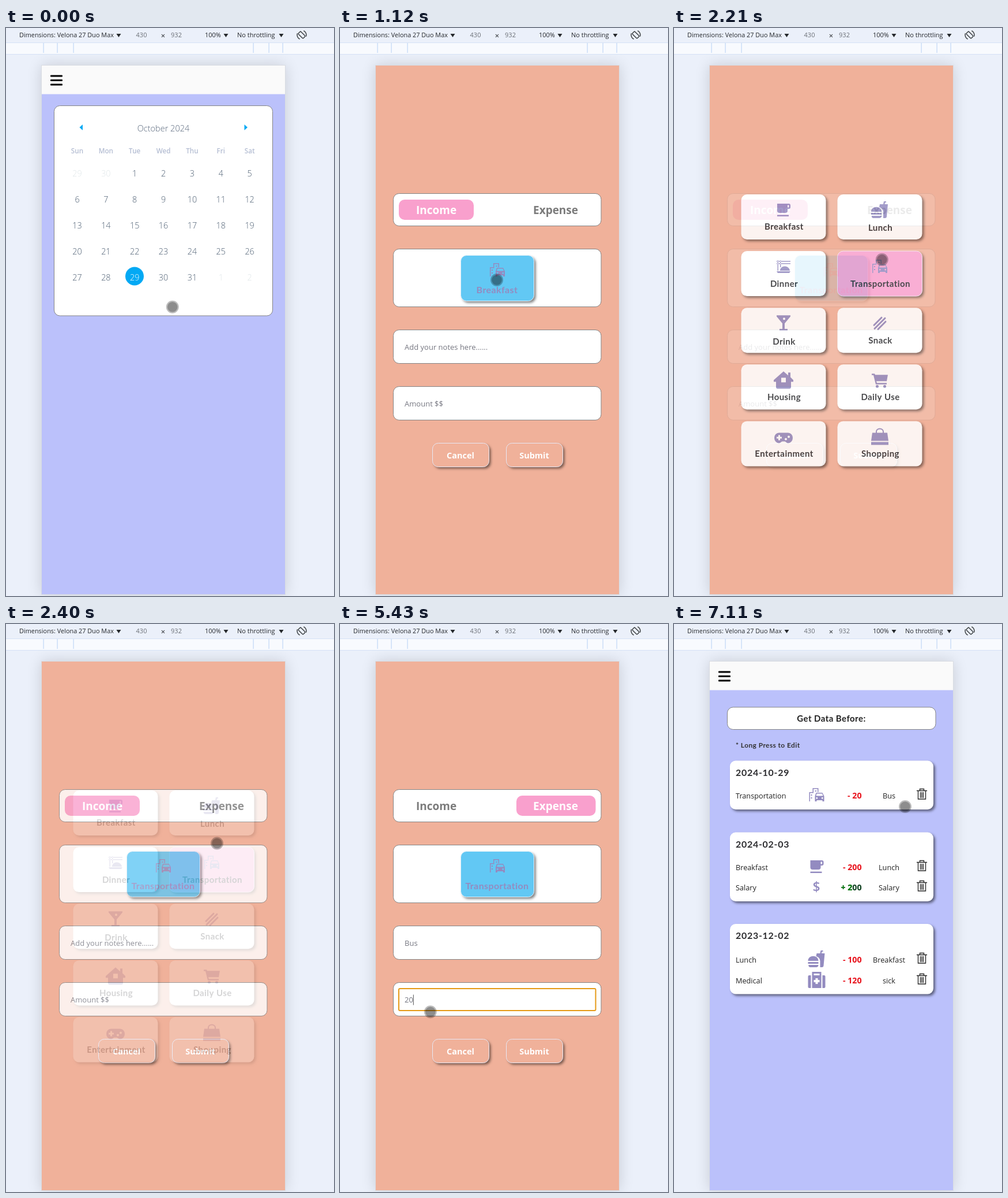
Write an HTML page with a canvas that moves like this. It is 569 by 983 pixels and loops after 7.57 s.

```html
<!DOCTYPE html>
<html lang="en">
<head>
<meta charset="utf-8">
<title>Budget calendar demo</title>
<style>
html, body { margin: 0; width: 100%; height: 100%; overflow: hidden; background: #ebf0fa; }
canvas { display: block; }
</style>
</head>
<body>
<canvas id="stage" width="569" height="983"></canvas>
<script>
const LOOP = 7570;
const stage = document.getElementById('stage');
const screen = stage.getContext('2d');
const layer = document.createElement('canvas');
layer.width = stage.width;
layer.height = stage.height;
const layerCtx = layer.getContext('2d');
let ctx = screen;

const UI = '"Open Sans", "Noto Sans", sans-serif';
const LATO = 'Lato, sans-serif';
const PEACH = '#f0b19a', LAVENDER = '#bbc1fb', PINK = '#f9a0cd', SKY = '#62c8f4';
const PURPLE = '#938bc0', BLUE = '#03a9f4', EDGE = '#858585';

// Icon outlines in pixels around their centre
const ICONS = {
  cup: 'M-11-11H9a3 3 0 0 1 3 3v3a3 3 0 0 1-3 3H7v3a4 4 0 0 1-4 4H-7a4 4 0 0 1-4-4zM7-8.5v4h2.5v-4zM-11 8.5H9V11H-11z',
  burger: 'M0-10H6l1-5h4v2H9l-.5 3H14L12 11a3 3 0 0 1-3 3H6V4c0-5-3-8-7-9zM-15 3c0-11 18-11 18 0zM-15 5H3v3H-15zM-14 10H3a4 4 0 0 1-4 4H-11a3 3 0 0 1-3-4z',
  noodles: 'M-12 8H12l-2 3H-10zM-10.5-11H-9V7h-1.5zM-6-11h1.5V1H-6zM-12-10H12v1.5H-12zM-12-6H12v1.5H-12zM-6 7c0-10 16-10 17 0z',
  transport: 'M-13 11V-5h6V-12H3v7H1.5v-5.5h-7v7h-6V11zM-10-1h2v2h-2zM-10 4h2v2h-2zM-2.5-8h2v2h-2zM-1-4H10l3 6v9H10V9H0v2H-3V2zM0-2.5L-1 1.5H11L9.5-2.5zM-1 4h2.5v2.5H-1zM8.5 4H11v2.5H8.5z',
  drink: 'M-12-13H12v2L2 1V10.5H7V13H-7v-2.5h5V1L-12-11zM-1-7a2 2 0 1 0 4 0a2 2 0 1 0-4 0z',
  house: 'M0-15L8-8V-13H12V-5L17 0V3H13V12a3 3 0 0 1-3 3H-10a3 3 0 0 1-3-3V3H-17V0zM-4-4V4H4V-4z',
  cart: 'M-14-12h5l1 2H14L12 1H-6l1 3H12v2.5H-7L-11-9.5h-3zM-7 10a2.5 2.5 0 1 0 5 0a2.5 2.5 0 1 0-5 0zM6 10a2.5 2.5 0 1 0 5 0a2.5 2.5 0 1 0-5 0z',
  gamepad: 'M-8-9H8a8 9 0 0 1 0 18C5 9 4 6 2 6H-2C-4 6-5 9-8 9A8 9 0 0 1-8-9zM-9-5h3v3h3v3h-3v3h-3v-3h-3v-3h3zM2 2a2 2 0 1 0 4 0a2 2 0 1 0-4 0zM7-2a2 2 0 1 0 4 0a2 2 0 1 0-4 0z',
  bag: 'M-13-7H-7V-9a7 6 0 0 1 14 0V-7H13L15 7H-15zM-5-7H5V-9a5 4 0 0 0-10 0zM-15 9H15V14H-15z',
  medical: 'M-15-6a2 2 0 0 1 2-2h3v22h-3a2 2 0 0 1-2-2zM15-6a2 2 0 0 0-2-2h-3v22h3a2 2 0 0 0 2-2zM-8-14H8V14H-8zM-5-11H5V-8H-5zM-2-3h4v3h3v4h-3v3h-4v-3h-3v-4h3z'
};
const LINE_ICONS = {
  hotdog: ['M-10 3L3-10M-3 10L10-3M-9 9L9-9', 3],
  trash: ['M-8.5-6H8.5M-3.5-6V-9H3.5V-6M-6.5-6V8.5H6.5V-6M-2.5-3V6M0-3V6M2.5-3V6', 1.4]
};

const CATEGORIES = [
  ['Breakfast', 'cup', 27, 56], ['Lunch', 'burger', 27, 57.5],
  ['Dinner', 'noodles', 27, 56], ['Transportation', 'transport', 27, 56],
  ['Drink', 'drink', 26, 58], ['Snack', 'hotdog', 27, 56],
  ['Housing', 'house', 27, 56], ['Daily Use', 'cart', 28, 56],
  ['Entertainment', 'gamepad', 29, 56], ['Shopping', 'bag', 27, 56]
];

const RECORDS = [
  { date: '2024-10-29', top: 236.5, height: 84.5, rows: [['Transportation', 'transport', '- 20', 'Bus', 297]] },
  { date: '2024-02-03', top: 360.5, height: 119.5, rows: [['Breakfast', 'cup', '- 200', 'Lunch', 421], ['Salary', '$', '+ 200', 'Salary', 456]] },
  { date: '2023-12-02', top: 519, height: 121.5, rows: [['Lunch', 'burger', '- 100', 'Breakfast', 581], ['Medical', 'medical', '- 120', 'sick', 617]] }
];

// time, x, y of the touch pointer
const POINTER = [
  [0, 289, 483], [240, 234, 440], [390, 234, 440], [700, 237, 436], [1120, 272, 436],
  [1580, 290, 435], [1920, 358, 412], [2110, 358, 412], [2400, 366, 380], [2530, 371, 322],
  [2810, 371, 322], [3200, 236, 538], [3390, 236, 538], [3650, 234, 536], [4120, 234, 536],
  [4720, 157, 667], [5370, 157, 667], [5430, 156, 671], [5650, 336, 741], [5750, 336, 741],
  [6170, 289, 286], [6700, 190, 191], [6950, 221, 231], [7110, 401, 316]
];

const FADES = [
  { at: 485, from: calendarPage, to: formPage },
  { at: 1175, from: formPage, to: gridPage },
  { at: 2115, from: gridPage, to: formPage },
  { at: 5720, from: formPage, to: listPage }
];
const FADE_TIME = 400;

// y is the middle of the capital letters
function text(s, x, y, size, color, { weight = 400, family = UI, align = 'left', spacing = 0 } = {}) {
  ctx.font = `${weight} ${size}px ${family}`;
  ctx.letterSpacing = spacing + 'px';
  ctx.textAlign = align;
  ctx.fillStyle = color;
  ctx.fillText(s, x, y + size * 0.36);
}

function rect(x, y, w, h, color) {
  ctx.fillStyle = color;
  ctx.fillRect(x, y, w, h);
}

function box(x, y, w, h, { fill, edge, r = 10, shadow = false, line = 1 }) {
  ctx.beginPath();
  ctx.roundRect(x, y, w, h, r);
  if (fill) {
    ctx.save();
    if (shadow) {
      ctx.shadowColor = 'rgba(0,0,0,.5)';
      ctx.shadowOffsetX = ctx.shadowOffsetY = 3;
      ctx.shadowBlur = 4;
    }
    ctx.fillStyle = fill;
    ctx.fill();
    ctx.restore();
  }
  if (edge) {
    ctx.strokeStyle = edge;
    ctx.lineWidth = line;
    ctx.stroke();
  }
}

function disc(x, y, r, color) {
  ctx.beginPath();
  ctx.arc(x, y, r, 0, Math.PI * 2);
  ctx.fillStyle = color;
  ctx.fill();
}

function polygon(color, ...points) {
  ctx.beginPath();
  points.forEach(([x, y]) => ctx.lineTo(x, y));
  ctx.fillStyle = color;
  ctx.fill();
}

function icon(name, x, y, color = PURPLE) {
  ctx.save();
  ctx.translate(x, y);
  if (LINE_ICONS[name]) {
    const [path, width] = LINE_ICONS[name];
    ctx.strokeStyle = color;
    ctx.lineWidth = width;
    ctx.lineCap = 'round';
    ctx.stroke(new Path2D(path));
  } else {
    ctx.fillStyle = color;
    ctx.fill(new Path2D(ICONS[name]), 'evenodd');
  }
  ctx.restore();
}

function browserFrame() {
  rect(0, 0, 569, 983, '#ebf0fa');
  ctx.save();
  ctx.shadowColor = 'rgba(0,0,0,.16)';
  ctx.shadowBlur = 24;
  rect(62, 65, 422, 915, '#fff');
  ctx.restore();
  rect(61, 64, 424, 917, '#d9dce2');
  rect(0, 0, 569, 25, '#ebf0fa');
  rect(0, 25, 569, 1, '#d5e1f5');
  rect(0, 26, 569, 19, '#f8fafe');
  rect(0, 45, 569, 1, '#d5e1f5');
  for (const x of [65, 89, 117, 429, 456, 480]) rect(x - 0.5, 26, 1.2, 17, '#bfd6f6');

  const dark = '#25282c', grey = '#6a6e75';
  text('Dimensions: Velona 27 Duo Max', 23, 12.5, 10.9, dark);
  text('430', 235, 12.5, 11, grey, { align: 'center' });
  text('×', 272.5, 13.5, 13, dark, { align: 'center' });
  text('932', 295.5, 12.5, 11, grey, { align: 'center' });
  text('100%', 345, 12.5, 11, dark);
  text('No throttling', 401, 12.5, 11, dark);
  for (const x of [195.5, 381.5, 477.5]) polygon(dark, [x - 4, 10], [x + 4, 10], [x, 16]);

  ctx.save();
  ctx.translate(513, 12);
  ctx.rotate(-Math.PI / 4);
  box(-3, -6, 6, 12, { edge: '#3c4043', r: 1.5, line: 1.5 });
  for (const start of [-0.35, Math.PI - 0.35]) {
    ctx.beginPath();
    ctx.arc(0, 0, 8, start, start + 1.5);
    ctx.stroke();
  }
  ctx.restore();
}

function appBase() {
  rect(62, 65, 422, 915, LAVENDER);
  rect(62, 65, 422, 49.5, '#fafafa');
  for (const y of [81.5, 89, 96.5]) box(77, y, 21, 3, { fill: '#000', r: 1 });
}

function calendarPage() {
  appBase();
  box(83.5, 134.5, 379, 363.5, { fill: '#fff', edge: EDGE });
  polygon(BLUE, [127.5, 172], [133, 167], [133, 177]);
  polygon(BLUE, [419, 172], [413.5, 167], [413.5, 177]);
  text('October 2024', 273, 174, 14.5, '#56657a', { weight: 300, align: 'center' });
  const column = i => 123.5 + 49.85 * i;
  ['Sun', 'Mon', 'Tue', 'Wed', 'Thu', 'Fri', 'Sat'].forEach((day, i) =>
    text(day, column(i), 212.5, 11.7, '#b5bed3', { weight: 600, align: 'center' }));
  disc(223, 429.5, 16, BLUE);
  for (let i = 0; i < 35; i++) {
    const n = i - 1;
    const outside = n < 1 || n > 31;
    const day = n < 1 ? n + 30 : n > 31 ? n - 31 : n;
    const color = outside ? '#dfe6e8' : n === 29 ? '#fff' : '#4a5c70';
    text(String(day), column(i % 7), 252 + 45.05 * Math.floor(i / 7), 14.4, color,
      { weight: 300, align: 'center' });
  }
}

function field(y, placeholder, value, focused) {
  box(92.5, y, 360.5, 58, { fill: '#fff', edge: EDGE });
  if (focused) box(102, y + 10.5, 341.5, 38, { edge: '#e59a17', r: 2, line: 2 });
  text(value || placeholder, 112, y + 30, 13, '#757680');
  if (focused) rect(112 + (value ? ctx.measureText(value).width : 0), y + 21, 1, 18, '#555');
}

function formPage(t) {
  rect(62, 65, 422, 915, PEACH);
  box(92.5, 286.5, 360.5, 56, { fill: '#fff', edge: EDGE });
  const expense = t >= 2840;
  if (expense) box(306, 297, 137.5, 35, { fill: PINK });
  else box(102, 297, 130, 35, { fill: PINK });
  text('Income', 132, 315.5, 19, expense ? '#7b7b7b' : '#fff', { weight: 700 });
  text('Expense', 335, 315.5, 19, expense ? '#fff' : '#7b7b7b', { weight: 700 });

  box(92.5, 382.5, 360.5, 100, { fill: '#fff', edge: EDGE });
  box(209.5, 393.5, 127, 79, { fill: SKY, edge: '#e4f2fb', shadow: true });
  icon('transport', 273, 419);
  text(t < 2100 ? 'Breakfast' : 'Transportation', 272.5, 453, 16, PURPLE,
    { weight: 700, family: LATO, align: 'center', spacing: 0.4 });

  const note = 'Bus'.slice(0, [3230, 3390, 3560].filter(at => t >= at).length);
  const amount = '20'.slice(0, [4960, 5090].filter(at => t >= at).length);
  field(522.5, 'Add your notes here......', note, t >= 3200 && t < 4700);
  field(620.5, 'Amount $$', amount, t >= 4700);

  for (const [label, x] of [['Cancel', 160.5], ['Submit', 288.5]]) {
    box(x, 718.5, 98, 41, { fill: PEACH, edge: '#e9e9f6', shadow: true });
    text(label, x + 48.5, 740, 14.5, '#fff', { weight: 700, align: 'center' });
  }
}

function gridPage(t) {
  rect(62, 65, 422, 915, PEACH);
  const selected = t < 2090 ? 'Breakfast' : 'Transportation';
  CATEGORIES.forEach(([label, name, iconY, labelY], i) => {
    const x = 116.5 + 167 * (i % 2);
    const y = 288 + 98.1 * Math.floor(i / 2);
    const on = label === selected;
    box(x, y, 147, 78, { fill: on ? PINK : '#fff', edge: on ? '#f6e3f0' : null, shadow: true });
    icon(name, x + 73.5, y + iconY);
    text(label, x + 74.5, y + labelY, 15, '#2b2b2e',
      { weight: 700, family: LATO, align: 'center', spacing: 0.43 });
  });
}

function listPage() {
  appBase();
  const bold = { weight: 700, family: LATO };
  box(92.5, 144, 361.5, 38.5, { fill: '#fff', edge: EDGE });
  text('Get Data Before:', 273, 164, 15, '#222', { ...bold, align: 'center', spacing: 0.45 });
  text('* Long Press to Edit', 107, 210, 12, '#333', { ...bold, spacing: 0.4 });
  for (const { date, top, height, rows } of RECORDS) {
    box(97, top, 353, height, { fill: '#fff', shadow: true });
    text(date, 107, top + 20.5, 16, '#2b2b2e', { ...bold, spacing: 0.7 });
    for (const [label, name, sum, note, y] of rows) {
      text(label, 107, y, 12.7, '#222');
      if (name === '$') text(name, 247, y - 1, 23, PURPLE, { weight: 600, align: 'center' });
      else icon(name, 247.5, y - 1);
      const gain = sum[0] === '+';
      const style = { weight: 700, align: 'right' };
      text(sum, 325.5, y - 0.5, 14.2, gain ? '#0b3d1c' : '#e8121c', style);
      if (gain) {
        const tail = ctx.measureText('00').width;
        text('+ 2', 325.5 - tail, y - 0.5, 14.2, '#087a10', style);
      }
      text(note, 373, y, 12.7, '#222', { align: 'center' });
      icon('trash', 430, y - 2.5, '#2a2a2a');
    }
  }
}

function pointer(t) {
  const next = POINTER.findIndex(p => p[0] > t);
  let [, x, y] = POINTER[POINTER.length - 1];
  if (next > 0) {
    const [t0, x0, y0] = POINTER[next - 1], [t1, x1, y1] = POINTER[next];
    const k = (t - t0) / (t1 - t0);
    x = x0 + (x1 - x0) * k;
    y = y0 + (y1 - y0) * k;
  }
  disc(x, y, 11, 'rgba(0,0,0,.26)');
  disc(x, y, 8.8, 'rgba(0,0,0,.25)');
}

function pages(t) {
  const fade = FADES.filter(f => t >= f.at).pop();
  if (!fade) return calendarPage(t);
  const k = Math.min(1, (t - fade.at) / FADE_TIME);
  if (k === 1) return fade.to(t);
  fade.from(t);
  ctx = layerCtx;
  ctx.clearRect(0, 0, layer.width, layer.height);
  fade.to(t);
  ctx = screen;
  ctx.globalAlpha = k * k * (3 - 2 * k);
  ctx.drawImage(layer, 0, 0);
  ctx.globalAlpha = 1;
}

const started = performance.now();
function frame() {
  const t = (performance.now() - started) % LOOP;
  browserFrame();
  pages(t);
  pointer(t);
  requestAnimationFrame(frame);
}
frame();
</script>
</body>
</html>
```
